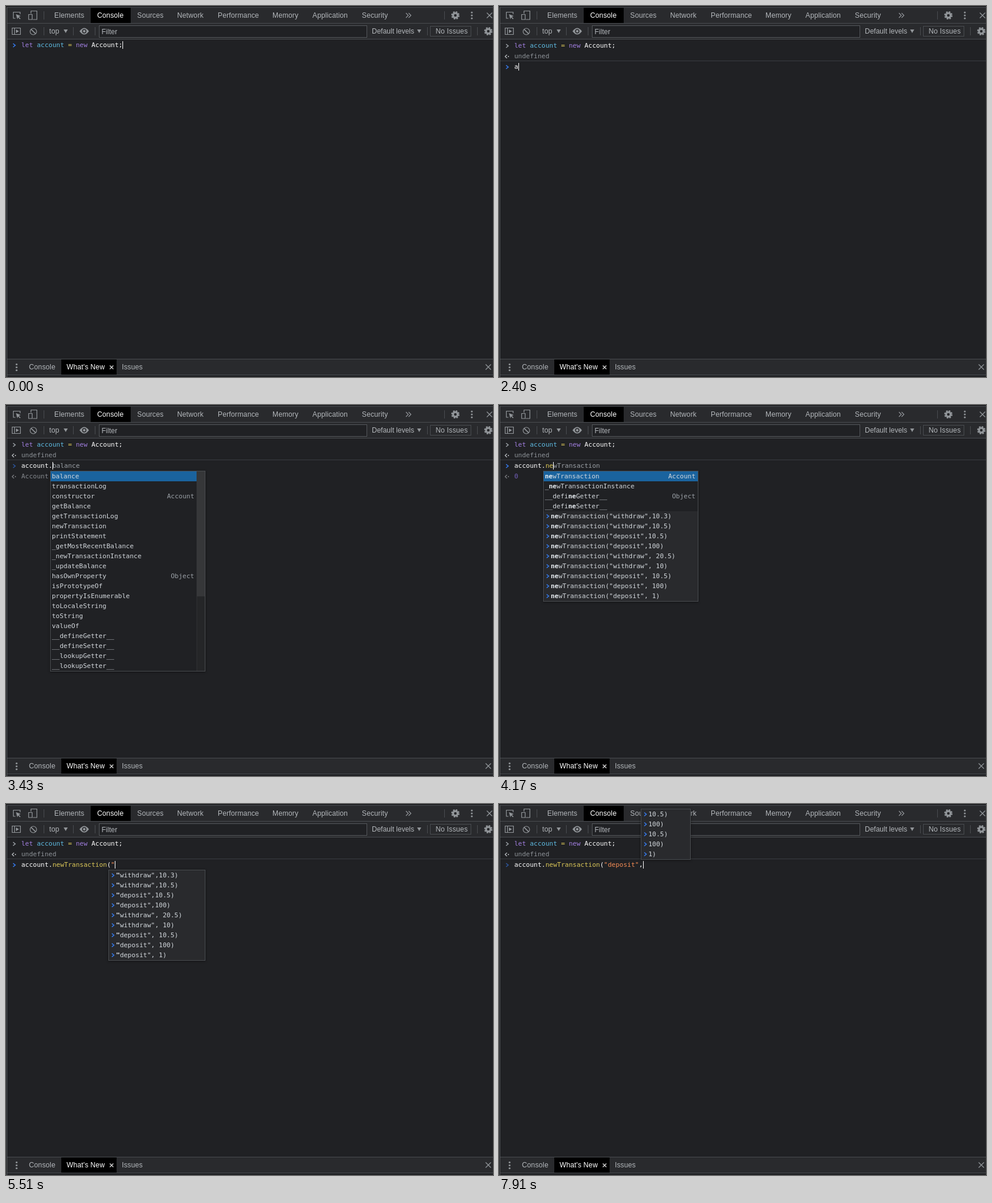
Recreate the animation shown at these times as an HTML page. Size 828 px wide and 632 px high, loop 8 s.

```html
<!DOCTYPE html>
<html lang="en">
<head>
<meta charset="utf-8">
<title>Console session</title>
<style>
html, body { margin: 0; width: 100%; height: 100%; overflow: hidden; background: #202124; }
svg { display: block; }
text { white-space: pre; }
.ui { font: 12px "Liberation Sans", Arial, sans-serif; fill: #b3b7bb; }
.tab { letter-spacing: .13px; }
.mono { font: 11px "DejaVu Sans Mono", Menlo, monospace; fill: #fff; }
.item { fill: #d3d8dd; }
.item tspan { font-weight: bold; fill: #e9eef3; }
.icon { fill: none; stroke: #919599; stroke-width: 1.2; }
.solid { fill: #919599; }
.popup { filter: drop-shadow(0 1px 2px rgba(0, 0, 0, .45)); }
</style>
</head>
<body>
<svg width="828" height="632" viewBox="0 0 828 632">
  <g id="chrome"></g>
  <g id="log"></g>
</svg>
<script>
const LOOP = 8000, CHAR = 6.622, LEFT = 26, ROW = 17, MAX_ROWS = 20;
const WHITE = '#fff', YELLOW = '#dcc858', ORANGE = '#f28b54', PURPLE = '#a17fe0',
  CYAN = '#5fbbe2', GREY = '#9aa0a6', BLUE = '#367cf1';

const globals = `account Accelerometer Account AbstractRange BackgroundFetchManager
  BackgroundFetchRecord BackgroundFetchRegistration Cache CacheStorage
  DeviceMotionEventAcceleration FontFace FontFaceSetLoadEvent HTMLTrackElement
  LinearAccelerationSensor MIDIAccess MediaKeySystemAccess MediaStreamTrack
  MediaStreamTrackEvent TextTrack TextTrackCue TextTrackCueList TextTrackList
  TrackEvent caches`.split(/\s+/).map(name => ({ name, owner: '' }));

const members = Object.entries({
  '': 'balance transactionLog',
  Account: 'constructor getBalance getTransactionLog newTransaction printStatement ' +
    '_getMostRecentBalance _newTransactionInstance _updateBalance',
  Object: 'hasOwnProperty isPrototypeOf propertyIsEnumerable toLocaleString toString valueOf ' +
    '__defineGetter__ __defineSetter__ __lookupGetter__ __lookupSetter__ __proto__',
}).flatMap(([owner, names]) => names.split(' ').map(name => ({ name, owner })));

const history = ['printStatement()', 'getTransactionLog()',
  ...['"withdraw",10.3', '"withdraw",10.5', '"deposit",10.5', '"deposit",100',
    '"withdraw", 20.5', '"withdraw", 10', '"deposit", 10.5', '"deposit", 100', '"deposit", 1']
    .map(args => `newTransaction(${args})`)].map(call => 'account.' + call);

// Each step: start time, typed line, start of the completed word (-1: no popup), result preview, busy
const OBJ = 'Account {balance: 0, transactionLog: Array(0)}';
const CALL = 'account.newTransaction';
const steps = [
  [1950, '', -1], [2400, 'a', -1], [2540, 'ac', 0, '', true], [2690, 'acc', 0, OBJ],
  [2840, 'accou', 0, OBJ], [3130, 'account', 0, OBJ],
  [3430, 'account.', 8, OBJ, true], [3580, 'account.', 8, '0'],
  [4030, 'account.n', 8, '0', true], [4170, 'account.ne', 8, '0'], [4320, 'account.new', 8, '0'],
  [4620, CALL, -1, '0'], [5210, CALL + '(', 23, '', true], [5510, CALL + '("', 23],
  ...[5960, 6110, 6260, 6410, 6560, 7010, 7160, 7460].map((t, i) =>
    [t, CALL + '("' + 'deposit"'.slice(0, i + 1), 23]),
  [7910, CALL + '("deposit",', 33, '', true],
];

const rect = (x, y, w, h, fill, extra = '') =>
  `<rect x="${x}" y="${y}" width="${w}" height="${h}" fill="${fill}" ${extra}/>`;
const frame = (x, y, w, h, fill, line) =>
  rect(x + .5, y + .5, w - 1, h - 1, fill, `stroke="${line}"`);
const text = (x, y, s, cls, extra = '') => `<text x="${x}" y="${y}" class="${cls}" ${extra}>${s}</text>`;
const path = (d, cls = 'icon', extra = '') => `<path d="${d}" class="${cls}" ${extra}/>`;
const stroke = (d, color, width = 1.5, extra = '') =>
  `<path d="${d}" fill="none" stroke="${color}" stroke-width="${width}" ${extra}/>`;
const code = parts => parts.map(([s, color]) => `<tspan fill="${color}">${s}</tspan>`).join('');
const mono = (x, y, parts) => text(x, y, code(parts), 'mono');
const prompt = (y, color, extra) => stroke(`M12 ${y - 3}l3.7 3-3.7 3`, color, 1.5, extra);
const reply = (y, color) => stroke(`M13.5 ${y - 3}l-3 3 3 3`, color, 1.4) +
  `<circle cx="16" cy="${y}" r="1.1" fill="${color}"/>`;
const caret = (chars, y) => rect(Math.round(LEFT + chars * CHAR), y, 1, 13, WHITE);

function drawChrome() {
  const sep = (x, y) => rect(x, y, 1, 14, '#494c50');
  const cross = (x, y, r, color = '#919599') =>
    stroke(`M${x - r} ${y - r}l${2 * r} ${2 * r}m0 ${-2 * r}l${-2 * r} ${2 * r}`, color, 1.3);
  const dots = (x, y) => [-5, 0, 5].map(d => `<circle cx="${x}" cy="${y + d}" r="1.6" class="solid"/>`).join('');
  const gear = (x, y) => `<g class="icon"><circle cx="${x}" cy="${y}" r="3.9" stroke-width="3.2"/>
    <circle cx="${x}" cy="${y}" r="6" stroke-width="2.2" stroke-dasharray="2.7 2.01"/></g>`;
  const down = (x, y) => path(`M${x} ${y}h7l-3.5 6z`, 'solid');
  const tabs = [[82, 'Elements'], [223, 'Sources'], [291, 'Network'], [360, 'Performance'],
    [453, 'Memory'], [521, 'Application'], [605, 'Security']];

  return rect(0, 0, 828, 632, '#202124') +
    rect(2, 3, 826, 53, '#292a2d') + rect(2, 602, 826, 26, '#292a2d') +
    [2, 29, 56, 601, 628].map(y => rect(2, y, 826, 1, '#494c50')).join('') +
    rect(0, 0, 1, 632, '#17181a') + rect(1, 2, 1, 630, '#5c5f63') +
    // main tabs
    rect(144, 3, 68, 26, '#000') + text(155, 20, 'Console', 'ui tab', 'style="fill:#fff"') +
    tabs.map(([x, s]) => text(x, 20, s, 'ui tab')).join('') +
    path('M24 14v-3.5H12.5V21H16') + path('M17 14l8 3-3.2 1.4 3 3-1.2 1.2-3-3-1.4 3z', 'solid') +
    path('M42.5 13V8.5h10v14.500h-7M38.500 14.500h6v8.500h-6z') +
    sep(64, 9) + sep(745, 9) +
    path('M680 12l4 4-4 4m4.500-8l4 4-4 4') +
    gear(764, 16) + dots(792, 16) + cross(822, 16, 4.5) +
    // console toolbar
    path('M10.500 37.500h14v11h-14zM14.500 37.500v11') + path('M17 40l5 3-5 3z', 'solid') +
    `<circle cx="46.500" cy="43.500" r="5.500" class="icon" stroke-width="1.5"/>` +
    stroke('M42.600 39.600l7.800 7.800', '#919599') +
    sep(64, 36) + text(73.5, 47, 'top', 'ui tab') + down(98, 40) + sep(114, 36) +
    path('M125 43q8-11 16 0q-8 11-16 0z', 'solid') +
    '<circle cx="133" cy="43" r="2.9" fill="#919599" stroke="#292a2d" stroke-width="1.5"/>' +
    sep(151, 36) + frame(158, 33, 456, 21, '#202124', '#54575b') +
    text(162.5, 48, 'Filter', 'ui') + text(622, 47, 'Default levels', 'ui') + down(699, 40) +
    sep(716, 36) + frame(721, 34, 70, 18, 'none', '#494c50') + text(730.5, 47, 'No Issues', 'ui tab') +
    sep(801, 36) + gear(820, 43) +
    // drawer
    dots(18, 615.5) + text(39, 619, 'Console', 'ui tab') + rect(94, 602, 94, 26, '#000') +
    text(103, 619, "What's New", 'ui tab', 'style="fill:#fff"') + cross(179.5, 615.5, 3, '#ddd') +
    text(197, 619, 'Issues', 'ui tab') + cross(820, 615, 4.5);
}

// Completions that contain the word, those that begin with it first
function matches(word, list) {
  const low = word.toLowerCase();
  const found = list.filter(m => m.name.toLowerCase().includes(low));
  const begins = m => m.name.toLowerCase().startsWith(low);
  return [...found.filter(begins), ...found.filter(m => !begins(m))];
}

function emphasise(s, word) {
  const at = s.toLowerCase().indexOf(word.toLowerCase());
  if (!word || at < 0) return s;
  const end = at + word.length;
  return `${s.slice(0, at)}<tspan>${s.slice(at, end)}</tspan>${s.slice(end)}`;
}

function popup(start, word, names, past) {
  const rows = [...names, ...past.map(name => ({ name, past: true }))];
  const shown = rows.slice(0, MAX_ROWS), scrolls = rows.length > MAX_ROWS;
  const x = Math.round(LEFT + start * CHAR - 4);
  const y = rows.length < 6 ? 8 : 112;
  const longest = Math.max(...past.map(s => s.length));
  const w = Math.min(305, Math.round(longest * CHAR) + 52);
  const h = shown.length * ROW + 2;
  const right = x + w - (scrolls ? 15 : 1);
  const owners = new Set(['']);

  let out = frame(x, y, w, h, '#202124', '#494c50');
  shown.forEach((row, i) => {
    const top = y + 1 + i * ROW, base = top + 12, label = emphasise(row.name, word);
    if (row.past) {
      out += rect(x + 1, top, right - x - 1, ROW, '#292a2d') +
        stroke(`M${x + 6} ${top + 5.5}l3.500 3-3.500 3`, BLUE) + text(x + 13, base, label, 'mono item');
      return;
    }
    if (i === 0) out += rect(x + 1, top, right - x - 1, ROW, '#1a639e');
    out += text(x + 3, base, label, 'mono item');
    if (!owners.has(row.owner)) {
      owners.add(row.owner);
      out += text(right - 4, base, row.owner, 'mono',
        `text-anchor="end" style="fill:${i ? GREY : '#d3d8dd'}"`);
    }
  });
  if (scrolls) {
    const view = MAX_ROWS * ROW;
    out += rect(right, y + 1, 14, view, '#252628') + rect(right, y + 1, 1, view, '#303134') +
      rect(right, y + 1, 14, Math.round(view * MAX_ROWS / rows.length), '#363739');
  }
  return `<g class="popup">${out}</g>`;
}

const command = [['let', PURPLE], [' account', CYAN], [' =', YELLOW], [' new', PURPLE], [' Account;', WHITE]];

function drawInput(caretOn) {
  return prompt(67, BLUE) + mono(LEFT, 70, command) + (caretOn ? caret(26, 60) : '');
}

function drawStep([, line, start, preview, busy]) {
  const word = start < 0 ? '' : line.slice(start);
  const names = start === 0 ? matches(word, globals) : start === 8 ? matches(word, members) : [];
  const past = history.filter(s => s.startsWith(line)).map(s => s.slice(start).trim());
  const tint = [WHITE, YELLOW, WHITE, ORANGE, WHITE];
  const parts = line.match(/^(\w*\.?)(\w*)(\(?)("[^"]*"?)?(.*)$/).slice(1)
    .map((s, i) => [s || '', tint[i]]);
  if (names.length) parts.push([names[0].name.slice(word.length), GREY]);

  let out = prompt(68, GREY) + mono(LEFT, 71, command) +
    reply(86, '#b3b7bb') + mono(LEFT, 89, [['undefined', '#8d9298']]) +
    rect(2, 93, 826, 1, '#3a3d41') +
    prompt(104, BLUE, busy ? 'opacity=".6"' : '') + mono(LEFT, 107, parts);
  if (preview) {
    out += reply(122, '#77797d') + mono(LEFT, 125, [[preview, preview === '0' ? '#7460bd' : '#85898e']]);
  }
  out += caret(line.length, 97);
  return start < 0 ? out : out + popup(start, word, names, past);
}

const log = document.getElementById('log');
document.getElementById('chrome').innerHTML = drawChrome();
let last;

function tick(now) {
  const t = now % LOOP;
  const step = steps.filter(s => s[0] <= t).pop();
  const key = step ? step[0] : t % 1050 < 600;
  if (key !== last) {
    last = key;
    log.innerHTML = step ? drawStep(step) : drawInput(key);
  }
  requestAnimationFrame(tick);
}
tick(0);
</script>
</body>
</html>
```
